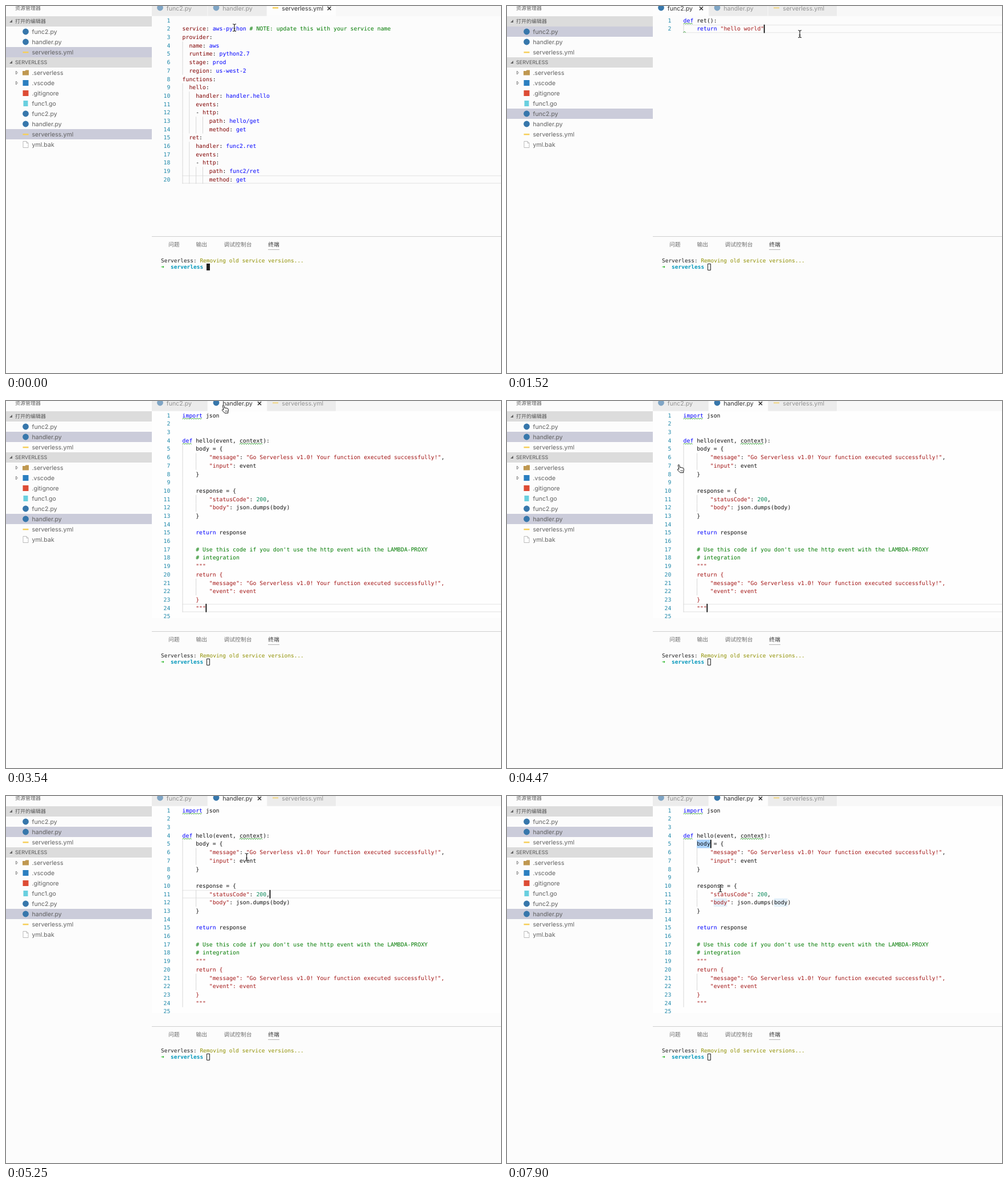
An HTML page with a canvas that plays this animation: 869x644 px, repeating every 8 s.

```html
<!DOCTYPE html>
<html lang="zh">
<head>
<meta charset="utf-8">
<style>
  html, body { margin: 0; width: 100%; height: 100%; overflow: hidden; background: #fcfcfc; }
  canvas { display: block; }
</style>
</head>
<body>
<canvas width="869" height="644"></canvas>
<script>
const ctx = document.querySelector('canvas').getContext('2d');
const LOOP = 8000;
const LEFT = 309.6, TOP = 18, CHAR = 5.9, LINE = 14.69;
const MONO = '"DejaVu Sans Mono", monospace';
const UI = 'Inter, "Noto Sans CJK SC", "Noto Sans CJK", sans-serif';

const pythonRules = {
  '#a31515': '"""[^]*?"""|"[^"\\n]*"',
  '#007a00': '#.*',
  '#0000ff': '\\b(?:import|def|return)\\b',
  '#09885a': '\\b\\d+\\b',
};
const yamlRules = {
  '#007a00': '#.*',
  '#800000': '\\w+(?=:)',
  '#0000ff': '(?<=: )[\\w./-]+',
};

const views = {
  yml: makeView(2, 2, yamlRules, `
service: aws-python # NOTE: update this with your service name
provider:
  name: aws
  runtime: python2.7
  stage: prod
  region: us-west-2
functions:
  hello:
    handler: handler.hello
    events:
    - http:
        path: hello/get
        method: get
  ret:
    handler: func2.ret
    events:
    - http:
        path: func2/ret
        method: get`, []),
  func2: makeView(0, 4, pythonRules, `def ret():
    return "hello world"`, [[1, 0, 3], [2, 0, 1]]),
  handler: makeView(1, 4, pythonRules, `import json


def hello(event, context):
    body = {
        "message": "Go Serverless v1.0! Your function executed successfully!",
        "input": event
    }

    response = {
        "statusCode": 200,
        "body": json.dumps(body)
    }

    return response

    # Use this code if you don't use the http event with the LAMBDA-PROXY
    # integration
    """
    return {
        "message": "Go Serverless v1.0! Your function executed successfully!",
        "event": event
    }
    """
`, [[1, 0, 6], [4, 0, 3], [4, 17, 7]]),
};

// Each step changes part of the state and holds until the next one.
const steps = [
  [0, { view: 'yml', mouse: [401, 38], line: 20, terminal: true }],
  [120, { mouse: [380, 16], hand: true }],
  [600, { mouse: [386, 9], hover: 1 }],
  [740, { terminal: false }],
  [1190, { view: 'handler', line: 24, caret: 7 }],
  [1520, { view: 'func2', line: 2, caret: 24, mouse: [514, 49], hand: false, hover: -1 }],
  [1850, { mouse: [524, 60] }],
  [2010, { mouse: [526, 65] }],
  [2170, { mouse: [427, 60] }],
  [2330, { mouse: [374, 50] }],
  [2740, { mouse: [400, 30], line: 0, selectAll: true, hover: 1 }],
  [2950, { mouse: [501.5, 46] }],
  [3340, { view: 'handler', line: 24, caret: 7, selectAll: false, mouse: [400, 9], hand: true }],
  [3540, { mouse: [385, 14] }],
  [3930, { mouse: [362, 70], hover: -1 }],
  [4110, { mouse: [335, 95] }],
  [4290, { mouse: [315, 112] }],
  [4470, { mouse: [305, 118.5] }],
  [4890, { mouse: [397, 72], hand: false, line: 4, caret: 15 }],
  [5250, { mouse: [422.5, 107], line: 11, caret: 26 }],
  [5640, { mouse: [424, 111] }],
  [5790, { mouse: [425, 114] }],
  [5950, { line: 0, word: 'event', wordLine: 7 }],
  [6100, { mouse: [421, 118] }],
  [6250, { mouse: [408, 120] }],
  [6400, { mouse: [392, 120] }],
  [6560, { mouse: [381.5, 119] }],
  [6860, { mouse: [364, 105] }],
  [7010, { mouse: [348, 87] }],
  [7160, { word: 'body', wordLine: 5, wordCaret: true }],
  [7310, { mouse: [350, 92] }],
  [7450, { mouse: [356, 110] }],
  [7600, { mouse: [364, 133] }],
  [7750, { mouse: [371, 152] }],
  [7900, { mouse: [374.5, 162] }],
];

function makeView(tab, indent, rules, text, warnings) {
  const colors = Object.keys(rules);
  const pattern = new RegExp(Object.values(rules).map(r => `(${r})`).join('|') + '|([^])', 'g');
  const runs = [];
  let row = 1, col = 0;
  for (const m of text.matchAll(pattern)) {
    const color = colors[m.slice(1).findIndex(g => g !== undefined)] || '#111';
    m[0].split('\n').forEach((part, i) => {
      if (i) { row++; col = 0; }
      if (part.trim()) runs.push([part, row, col, color]);
      col += part.length;
    });
  }
  return { tab, indent, runs, warnings, lines: text.split('\n') };
}

const colX = col => LEFT + col * CHAR;
const rowY = row => TOP + (row - 1) * LINE;

function rect(x, y, w, h, color) {
  ctx.fillStyle = color;
  ctx.fillRect(x, y, w, h);
}

function text(str, x, y, color, font) {
  ctx.font = font;
  ctx.fillStyle = color;
  ctx.fillText(str, x, y);
}

function shape(d, fill, stroke, width = 1) {
  const path = new Path2D(d);
  if (fill) { ctx.fillStyle = fill; ctx.fill(path); }
  if (stroke) { ctx.strokeStyle = stroke; ctx.lineWidth = width; ctx.stroke(path); }
}

function icon(kind, x, y) {
  ctx.save();
  ctx.translate(x, y);
  if (kind === 'py') {
    ctx.beginPath();
    ctx.arc(0, 0, 5.4, 0, 7);
    ctx.fillStyle = '#3777ab';
    ctx.fill();
  }
  if (kind === 'yml') rect(-5, -1, 10, 2.5, '#f6cf5a');
  if (kind === 'git') rect(-5, -5, 10, 10, '#dd4c35');
  if (kind === 'go') rect(-4, -5, 8, 10, '#69cfdf');
  if (kind === 'code') rect(-5, -5, 10, 10, '#2a7fc0');
  if (kind === 'folder') shape('M-5.5-3H-1L0-4.5H5.5V4.5H-5.5Z', '#bf9850');
  if (kind === 'file') shape('M-4.5-5.5H1.5L4.5-2.5V5.5H-4.5ZM1.5-5.5V-2.5H4.5', '#fff', '#aaa', .8);
  ctx.restore();
}

const openFiles = [['func2.py', 'py'], ['handler.py', 'py'], ['serverless.yml', 'yml']];
const treeFiles = [['.serverless', 'folder'], ['.vscode', 'code'], ['.gitignore', 'git'],
  ['func1.go', 'go'], ...openFiles, ['yml.bak', 'file']];

function drawSidebar(active) {
  text('资源管理器', 16, 7.4, '#616161', `9px ${UI}`);
  [['打开的编辑器', 18], ['SERVERLESS', 90]].forEach(([title, y]) => {
    rect(0, y, 256, 18, '#dcdcdc');
    shape(`M11 ${y + 6}V${y + 11}H6Z`, '#646465');
    text(title, 16, y + 12.3, '#555', `9px ${UI}`);
  });
  const fileRow = ([name, kind], y, selected) => {
    if (selected) rect(0, y, 256, 18, '#cbccda');
    icon(kind, 34.5, y + 9);
    text(name, 45.5, y + 12.7, '#606060', `10.6px ${UI}`);
  };
  openFiles.forEach((f, i) => fileRow(f, 36 + i * 18, i === active));
  treeFiles.forEach((f, i) => {
    const y = 108 + i * 18;
    fileRow(f, y, i === active + 4);
    if (i < 2) shape(`M17.5 ${y + 6}L20.5 ${y + 9}L17.5 ${y + 12}Z`, null, '#777', .9);
  });
}

function drawTabs(active, hover) {
  const edges = [256, 354.5, 458.5, 580];
  const closeX = [341, 445, 567.5];
  rect(256, 0, 613, 17.5, '#f8f8f8');
  openFiles.forEach(([name, kind], i) => {
    const x = edges[i];
    rect(x, 0, edges[i + 1] - x - 1, 17.5, i === active ? '#fdfdfd' : '#ececec');
    ctx.globalAlpha = i === active ? 1 : .6;
    icon(kind, x + 14.5, 3);
    ctx.globalAlpha = 1;
    text(name, x + 25.8, 7.5, i === active ? '#333' : '#929292', `10.6px ${UI}`);
    if (i === active || i === hover) {
      const c = closeX[i];
      shape(`M${c - 3} 1.2l6 6m0-6l-6 6`, null, '#333', 1.6);
    }
  });
}

function squiggle(row, col, length) {
  const x = colX(col), y = rowY(row) + 14;
  let d = `M${x} ${y}`;
  for (let i = 1; i * 2 <= length * CHAR; i++) d += `L${x + i * 2} ${y - (i % 2) * 2}`;
  shape(d, null, '#2a9a2a', 1);
}

function drawEditor(s) {
  const { lines, runs, indent, warnings } = views[s.view];
  if (s.view === 'handler') rect(256, 17.5, 613, 364, '#fefefe');
  if (s.line) {
    const y = rowY(s.line);
    rect(LEFT, y, 560, 1.4, '#eaeaea');
    rect(LEFT, y + LINE - 1.4, 560, 1.4, '#eaeaea');
  }
  if (s.selectAll) lines.forEach((l, i) =>
    rect(LEFT, rowY(i + 1), (l.length + (i < lines.length - 1)) * CHAR, LINE, '#add6ff'));
  if (s.word) lines.forEach((l, i) => {
    for (const m of l.matchAll(new RegExp(`\\b${s.word}\\b`, 'g')))
      rect(colX(m.index), rowY(i + 1), s.word.length * CHAR, LINE,
        i + 1 === s.wordLine ? '#a9d1fb' : '#e3f0fa');
  });

  let depth = 0;
  for (let i = lines.length - 1; i >= 0; i--) {
    if (lines[i]) depth = lines[i].search(/\S/);
    for (let c = 0; c < depth; c += indent) rect(colX(c), rowY(i + 1), .9, LINE, '#d3d3d3');
  }
  ctx.textAlign = 'right';
  lines.forEach((_, i) => text(i + 1, 288.3, rowY(i + 1) + 10.7, '#2089aa', `9.8px ${MONO}`));
  ctx.textAlign = 'left';
  for (const [str, row, col, color] of runs)
    text(str, colX(col), rowY(row) + 10.7, color, `9.8px ${MONO}`);
  warnings.forEach(w => squiggle(...w));

  if (s.line && !s.terminal) rect(colX(s.caret) - .4, rowY(s.line), 1.7, LINE, '#000');
  if (s.wordCaret) rect(357, rowY(5), 1.7, LINE, '#000');
}

function drawPanel(focused) {
  rect(256, 404, 613, 1, '#cecece');
  [['问题', 285], ['输出', 333.5], ['调试控制台', 382.5], ['终端', 460.3]].forEach(([name, x], i) =>
    text(name, x, 421.5, i === 3 ? '#333' : '#707070', `${i === 3 ? 500 : 400} 9.8px ${UI}`));
  rect(460, 427, 20, 1, '#b5b5b5');
  const font = `9.47px ${MONO}`;
  text('Serverless:', 272, 449.8, '#222', font);
  text('Removing old service versions...', 340.4, 449.8, '#909000', font);
  text('➜', 272, 461.3, '#14b014', `bold ${font}`);
  text('serverless', 289.1, 461.3, '#0598bc', `bold ${font}`);
  if (focused) rect(352, 452, 6, 12, '#222');
  else shape('M352.5 452.5h5v11h-5z', null, '#222');
}

function drawMouse([x, y], hand) {
  ctx.save();
  ctx.translate(x, y);
  if (hand) {
    shape('M-3 1.5L-4.6-5.4Q-4.6-7-3.4-6.8Q-2.6-6.8-2.2-5.2L-1.2-1.5Q0-2.8 1-1.4Q2.2-2.4 3-1'
      + 'Q4.8-1.6 5.2.4Q6 3 4.8 5.2V7.2H-1L-5.5 2.5Q-6 1-4.5.8Z', '#fff', '#111', 1);
    shape('M0 2.5v2.5M1.7 2.5v2.5M3.4 2.5v2.5', null, '#111', .6);
  } else {
    const beam = 'M-3-6.3Q0-6.3 0-4.5Q0-6.3 3-6.3M0-4.5V4.5M-3 6.3Q0 6.3 0 4.5Q0 6.3 3 6.3M-1.5 2H1.5';
    shape(beam, null, '#fff', 2.2);
    shape(beam, null, '#111', 1.1);
  }
  ctx.restore();
}

function draw() {
  const time = performance.now() % LOOP;
  const s = Object.assign({}, ...steps.filter(([t]) => t <= time).map(([, change]) => change));
  ctx.textRendering = 'geometricPrecision';
  rect(0, 0, 869, 644, '#fcfcfc');
  drawSidebar(views[s.view].tab);
  drawEditor(s);
  drawTabs(views[s.view].tab, s.hover);
  drawPanel(s.terminal);
  drawMouse(s.mouse, s.hand);
  requestAnimationFrame(draw);
}
draw();
</script>
</body>
</html>
```
